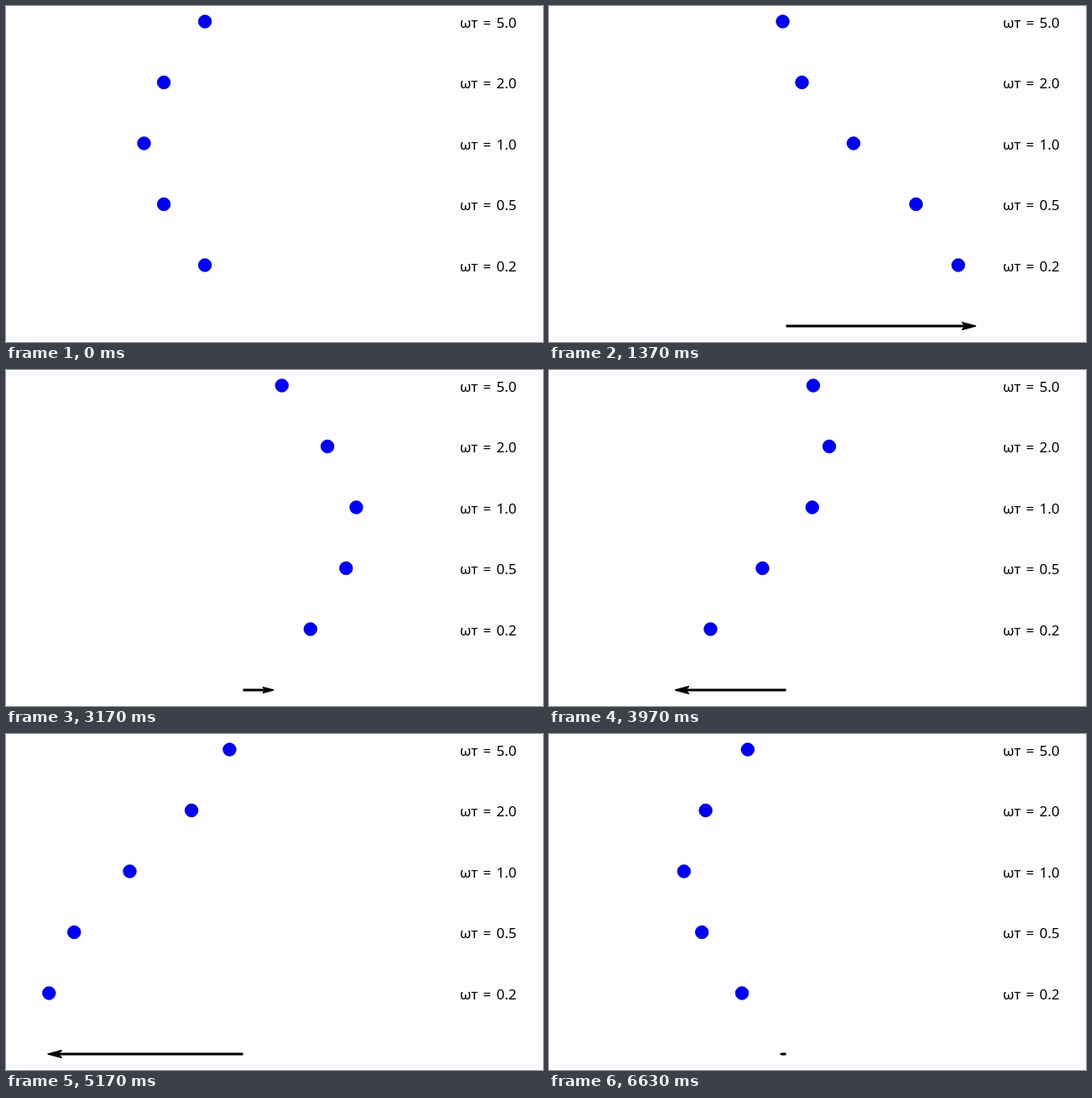
Recreate the animation shown at these times as an HTML page. Size 640 px wide and 400 px high, loop 6660 ms.

```html
<!DOCTYPE html>
<html lang="en">
<head>
<meta charset="utf-8">
<title>Relaxation response</title>
<style>
  html, body { margin: 0; width: 100%; height: 100%; overflow: hidden; background: #fdfdff; }
  svg { display: block; width: 640px; height: 400px; }
  text { font: 17px "Noto Sans", "Open Sans", sans-serif; fill: #000; }
  circle { fill: #0000f5; stroke: #0000a8; stroke-width: .8; }
  #shaft { stroke: #000; stroke-width: 3; }
  #head { fill: #000; stroke: #000; stroke-width: 1.5; stroke-linejoin: round; }
</style>
</head>
<body>
<svg id="stage" viewBox="0 0 640 400">
  <line id="shaft" y1="381" y2="381"/>
  <path id="head"/>
</svg>
<script>
const LOOP = 6660, STEPS = 200;
const CENTER = 282.5, AMP = 236, TOP = 18.5, GAP = 72.5, ARROW_Y = 381;
const ratios = [5, 2, 1, 0.5, 0.2];
const stage = document.getElementById("stage");
const shaft = document.getElementById("shaft");
const head = document.getElementById("head");

function add(tag, attrs, text = "") {
  const el = document.createElementNS("http://www.w3.org/2000/svg", tag);
  for (const key in attrs) el.setAttribute(key, attrs[key]);
  el.textContent = text;
  return stage.appendChild(el);
}

const dots = ratios.map((ratio, i) => {
  const cy = TOP + GAP * i, y = cy + 7;
  add("text", { x: 541, y }, "ωт");
  add("text", { x: 568.5, y }, "=");
  add("text", { x: 584.5, y }, ratio.toFixed(1));
  return add("circle", { cy, r: 7.8 });
});

function drawArrow(force) {
  const size = Math.abs(force), dir = Math.sign(force);
  const shown = size > 0.5 ? "visible" : "hidden";
  shaft.setAttribute("visibility", shown);
  head.setAttribute("visibility", shown);

  const len = Math.min(16, size / 3);
  const half = len * 0.27;
  const tip = CENTER + force - dir * 0.7;
  const back = tip - dir * len;
  const notch = tip - dir * len * 0.75;
  shaft.setAttribute("x1", CENTER);
  shaft.setAttribute("x2", notch);
  head.setAttribute("d",
    `M${tip} ${ARROW_Y}L${back} ${ARROW_Y - half}L${notch} ${ARROW_Y}L${back} ${ARROW_Y + half}Z`);
}

// Steps start at 0, 30 and 70 ms of every tenth of a second.
function stepAt(time) {
  const rest = time % 100;
  return 3 * Math.floor(time / 100) + (rest >= 70 ? 2 : rest >= 30 ? 1 : 0);
}

function draw(time) {
  const phase = 2 * Math.PI * stepAt(time % LOOP) / STEPS;
  ratios.forEach((ratio, i) => {
    const gain = AMP / Math.hypot(1, ratio);
    dots[i].setAttribute("cx", CENTER + gain * Math.sin(phase - Math.atan(ratio)));
  });
  drawArrow(AMP * Math.sin(phase));
}

const start = performance.now();
function tick() {
  draw(performance.now() - start);
  requestAnimationFrame(tick);
}
tick();
</script>
</body>
</html>
```
